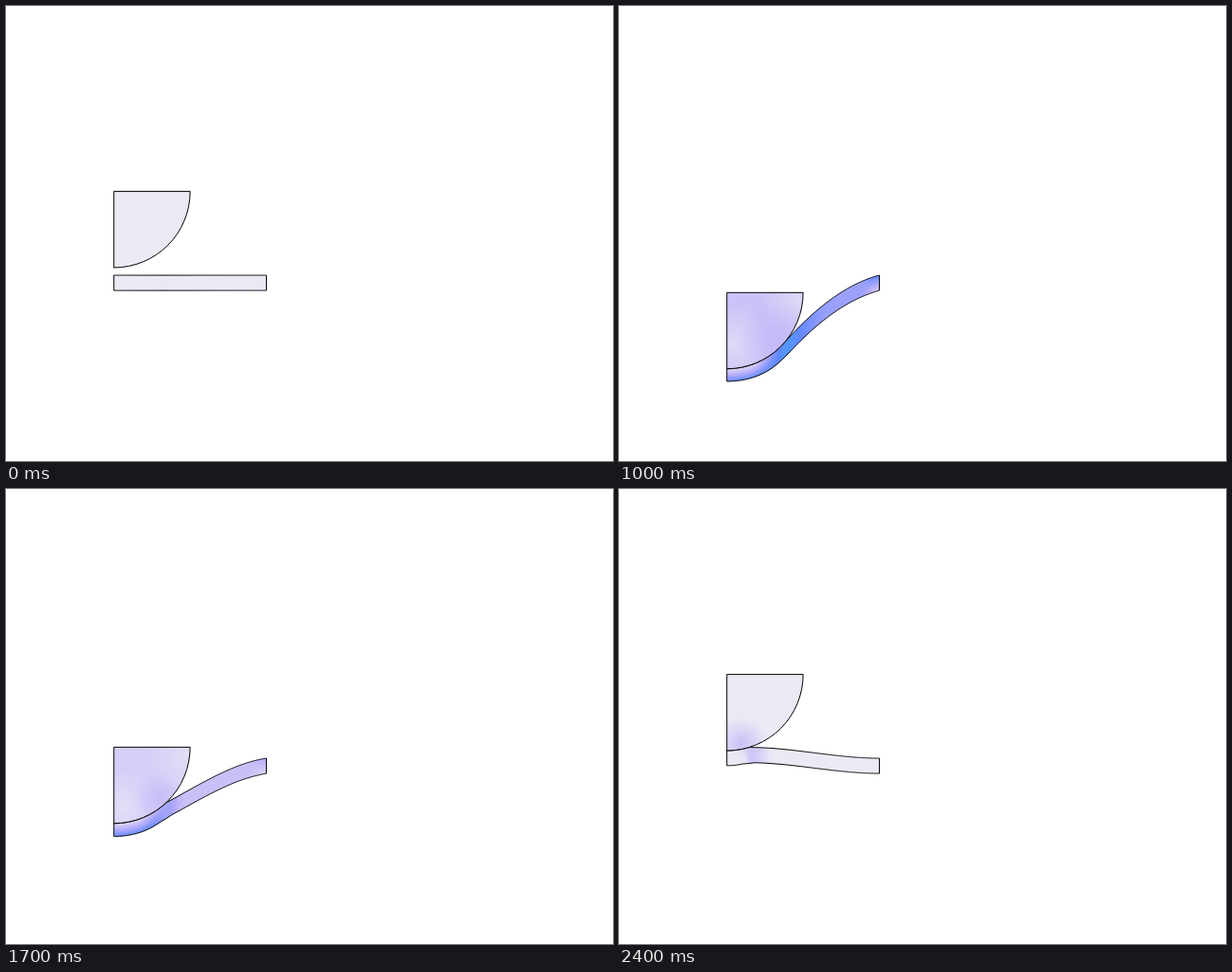
Recreate the animation shown at these times as an HTML page with a canvas. Size 640x480 px, loop 2500 ms.

```html
<!DOCTYPE html>
<html>
<head>
<meta charset="utf-8">
<title>Punch pressing a beam</title>
<style>
html, body { margin: 0; width: 100%; height: 100%; overflow: hidden; background: #fff; }
canvas { display: block; }
</style>
</head>
<body>
<canvas id="stage" width="640" height="480"></canvas>
<script>
const ctx = document.getElementById('stage').getContext('2d');

// The punch radius sets every other length; the origin is the punch corner at rest.
const R = 80.4, ORIGIN = [113.75, 195.6];
const LENGTH = 2 * R, DEPTH = .2 * R, REST = 1.1 * R;
const GAP = .1, STROKE = 1.5;
const STEP = 100, HALF = 12;
const palette = [[234, 234, 245], [190, 176, 249], [96, 136, 255], [16, 240, 240]];

const clamp = v => Math.min(1, Math.max(0, v));
const smooth = u => u * u * (3 - 2 * u);
const mix = (a, b, u) => a + (b - a) * u;

function color(stress, alpha = 1) {
  const at = clamp(stress) * 3, i = Math.min(2, Math.floor(at));
  const rgb = palette[i].map((v, k) => Math.round(mix(v, palette[i + 1][k], at - i)));
  return `rgba(${rgb},${alpha})`;
}

// Smooth curve through [x, value] points.
function along(points, x) {
  let i = 1;
  while (i < points.length - 1 && points[i][0] < x) i++;
  const [[x0, a], [x1, b]] = [points[i - 1], points[i]];
  return mix(a, b, smooth(clamp((x - x0) / (x1 - x0))));
}

// The first step of each stroke covers the gap, the others share the rest evenly.
function pose(step) {
  const loading = step <= HALF, n = loading ? step : step - HALF;
  const move = n ? GAP + STROKE * (n - 1) / (HALF - 1) : 0;
  const drop = loading ? move : GAP + STROKE - move;
  const press = (drop - GAP) / STROKE, p = clamp(press);
  const sine = loading ? .78 * Math.sin(p * Math.PI / 2) : .33 + .62 * press;
  return {
    loading, p, top: drop * R, contact: sine * R,
    slope: loading ? -Math.tan(Math.asin(sine)) : -.95 * p,
    tipSlope: -.35 * p ** 1.5,
    thin: DEPTH - 2.7 * Math.sin(p * Math.PI / 2)
  };
}

function beamEdges({ loading, top, contact, slope, tipSlope, thin }) {
  const arc = x => top + Math.sqrt(R * R - x * x);
  const start = loading ? Math.max(arc(contact), REST) : arc(contact);
  const free = LENGTH - contact;
  const upper = x => {
    if (x < contact) return arc(x);
    const u = (x - contact) / free;
    return mix(start, REST, smooth(u))
      + free * (slope * u * (1 - u) ** 2 + tipSlope * u * u * (u - 1));
  };
  const lower = x => {
    const h = Math.min(6, LENGTH - x);
    const bend = (upper(Math.abs(x - h)) + upper(x + h)) / 2;
    return bend + mix(thin, DEPTH, smooth(clamp(x / (contact + 16))));
  };
  return { upper, lower };
}

function beamStress({ loading, p, contact }) {
  const root = .64 * Math.min(1, 2.5 * p);
  const peak = loading ? .92 * p ** 1.3 : .2 + .4 * p;
  const span = (loading ? .56 : .42) * p;
  const bend = contact + 2, mid = mix(contact, LENGTH, loading ? .5 : .2);
  const profile = (value, reach, tip) =>
    [[0, value], [bend * reach, value], [bend, peak], [mid, span], [LENGTH - 22, span], [LENGTH, tip]];
  return [profile(.15 * root, .35, .88 * p ** 1.5), profile(root, .7, .2 * p)];
}

function drawBeam(state) {
  const { upper, lower } = beamEdges(state);
  const [above, below] = beamStress(state);
  const outline = new Path2D();
  for (let x = 0; x <= LENGTH; x += R / 80) outline.lineTo(x, upper(x));
  outline.lineTo(LENGTH, REST);
  for (let x = LENGTH; x > 0; x -= R / 80) outline.lineTo(x, lower(x));
  outline.lineTo(0, lower(0));
  outline.closePath();

  ctx.save();
  ctx.clip(outline);
  for (let x = 0; x < LENGTH; x++) {
    const y0 = upper(x), y1 = lower(x);
    const a = along(above, x), b = along(below, x);
    const fill = ctx.createLinearGradient(0, y0, 0, y1);
    for (let u = 0; u <= 1; u += .25) fill.addColorStop(u, color(mix(a, b, u)));
    ctx.fillStyle = fill;
    ctx.fillRect(x, y0 - 3, 2, y1 - y0 + 6);
  }
  ctx.restore();
  ctx.stroke(outline);
}

function glow(x, y, radius, stress) {
  const fill = ctx.createRadialGradient(x, y, 0, x, y, radius);
  fill.addColorStop(0, color(stress, .85));
  fill.addColorStop(1, color(stress, 0));
  ctx.fillStyle = fill;
  ctx.fill();
}

function drawPunch({ loading, p, top, contact }) {
  ctx.translate(0, top);
  ctx.beginPath();
  ctx.moveTo(0, 0);
  ctx.arc(0, 0, R, 0, Math.PI / 2);
  ctx.closePath();
  ctx.fillStyle = color(.28 * p);
  ctx.fill();
  glow(R * .12, R * (1 - .4 * p), 40, .08 * p);
  glow(R, R * .1, 45, .08 * p);
  glow(contact - 8, Math.sqrt(R * R - contact * contact) - 4, loading ? 42 : 28, loading ? .36 * p : .28);
  ctx.stroke();
}

function draw() {
  const state = pose(Math.floor(performance.now() / STEP) % (2 * HALF + 1));
  ctx.clearRect(0, 0, 640, 480);
  ctx.save();
  ctx.translate(...ORIGIN);
  drawBeam(state);
  drawPunch(state);
  ctx.restore();
  requestAnimationFrame(draw);
}
draw();
</script>
</body>
</html>
```
